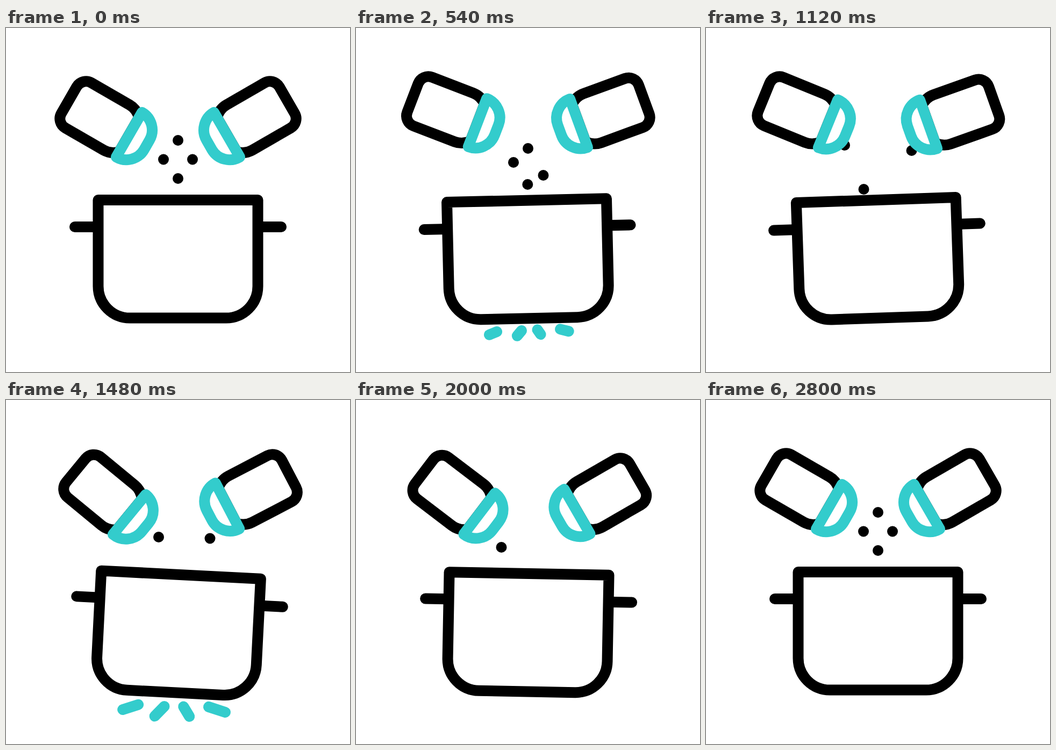
Write an HTML page that moves like this. It is 640 px wide and 640 px high and loops after 3.4 s.

```html
<!DOCTYPE html>
<html lang="en">
<head>
<meta charset="utf-8">
<title>Seasoning the pot</title>
<style>
  html, body { margin: 0; width: 100%; height: 100%; overflow: hidden; background: #fff; }
  svg { display: block; width: 100vw; height: 100vh; }
  .line { fill: #fff; stroke: #000; stroke-width: 20; stroke-linecap: round; stroke-linejoin: round; }
  .teal { stroke: #33cccc; }
</style>
</head>
<body>
<svg viewBox="0 0 640 640">
  <defs>
    <g id="shaker">
      <path class="line" d="M0 -37Q-12 -48.5 -27 -48.5H-109a20 20 0 0 0 -20 20V28.5a20 20 0 0 0 20 20H-27Q-12 48.5 0 37Z"/>
      <path class="line teal" d="M0 -48A38 38 0 0 1 38 -10V10A38 38 0 0 1 0 48Z"/>
    </g>
  </defs>
  <g id="dots"></g>
  <g id="pot">
    <g id="flames"></g>
    <path class="line" d="M128 370H512"/>
    <path class="line" d="M171.5 320H468.5V480.5a59 59 0 0 1 -59 59H230.5a59 59 0 0 1 -59 -59Z"/>
  </g>
  <use id="left" href="#shaker"/>
  <g transform="translate(640 0) scale(-1 1)"><use id="right" href="#shaker"/></g>
</svg>
<script>
const LOOP = 3400, STEP = 20;
const $ = id => document.getElementById(id);

function add(parent, tag, attrs) {
  const el = document.createElementNS('http://www.w3.org/2000/svg', tag);
  for (const k in attrs) el.setAttribute(k, attrs[k]);
  return parent.appendChild(el);
}

// Smooth curve through keys [time, ...values], flat at turning points and ends.
function slope(keys, i, c) {
  const a = keys[i - 1], b = keys[i], d = keys[i + 1];
  if (!a || !d || (b[c] - a[c]) * (d[c] - b[c]) <= 0) return 0;
  return (d[c] - a[c]) / (d[0] - a[0]);
}

function sample(keys, t) {
  const last = keys.length - 1;
  if (t <= keys[0][0]) return keys[0].slice(1);
  if (t >= keys[last][0]) return keys[last].slice(1);
  const i = keys.findIndex(k => k[0] > t) - 1;
  const a = keys[i], b = keys[i + 1], h = b[0] - a[0], s = (t - a[0]) / h;
  const s2 = s * s, s3 = s2 * s;
  return a.slice(1).map((v, n) => {
    const c = n + 1;
    return v + (b[c] - v) * (3 * s2 - 2 * s3)
      + h * slope(keys, i, c) * (s3 - 2 * s2 + s)
      + h * slope(keys, i + 1, c) * (s3 - s2);
  });
}

// Shaker poses: time, cap centre x, y, tilt.
const REST = [229, 198.5, 30], UP = [225.7, 175, 20], DOWN = [229.5, 215, 41];
const leftKeys = [
  [200, ...REST], [500, ...UP], [540, 226, 176, 21], [800, ...DOWN],
  [1070, ...UP], [1120, 227, 178, 22.2], [1430, ...DOWN], [1480, 229.5, 213, 39.5],
  [1720, ...UP], [1950, 229.5, 213, 39], [2000, 229.5, 211.5, 37.3],
  [2180, 225.7, 178, 20], [2350, ...REST]
];
const rightKeys = [
  [200, ...REST], [540, 225.5, 177, 20.1], [580, ...UP], [820, ...DOWN],
  [1080, ...UP], [1120, 226, 179, 19.6], [1340, ...DOWN], [1480, 228, 197, 27.6],
  [1610, ...UP], [1860, ...DOWN], [2000, 228.5, 207.5, 30],
  [2180, 225.7, 178, 20], [2350, ...REST]
];

// Pot: time, drop, tilt.
const potKeys = [
  [200, 0, 0], [400, 0, -2.6], [540, .7, -1.3], [780, 4, 2.6], [1120, 0, -1.95],
  [1180, 0, -2.3], [1480, 5, 2.9], [1780, 0, -2], [2000, 3, 1.06],
  [2120, 3, 1.7], [2360, .7, .3], [2480, 0, 0]
];

// Grains: time, x, y; each one shows only between its first and last key.
const grains = [
  [[0, 320, 209], [220, 320, 209], [540, 320, 224], [900, 320, 335]],
  [[0, 293, 244.5], [360, 293, 244.5], [540, 293, 250], [1120, 293.5, 300], [1400, 293.5, 335]],
  [[0, 347, 244.5], [220, 347, 244.5], [540, 348.5, 274], [860, 350, 335]],
  [[0, 320, 280], [360, 320, 280], [540, 319.3, 291], [860, 318, 335]],
  [[1040, 246, 190], [1120, 258, 218], [1480, 284, 255], [1820, 300, 335]],
  [[1000, 400, 190], [1120, 382.5, 228], [1480, 379.5, 257.5], [1820, 372, 335]],
  [[1760, 238, 212], [2000, 270.5, 274], [2260, 295, 335]],
  [[2180, 258, 188], [2360, 299.5, 202], [2700, 320, 209], [LOOP, 320, 209]],
  [[2260, 258, 186], [2360, 277, 217], [2800, 293, 244.5], [LOOP, 293, 244.5]],
  [[2240, 397, 190], [2360, 365, 225], [2800, 347, 244.5], [LOOP, 347, 244.5]],
  [[2160, 400, 206], [2360, 340, 261.5], [2700, 320, 280], [LOOP, 320, 280]]
].map(keys => ({ keys, el: add($('dots'), 'circle', { r: 10 }) }));

// Flame strokes: inner x, y, outer x, y.
const flames = [
  [259, 563, 222, 577], [305, 562, 283, 587], [334.5, 561, 350, 584], [377, 561, 418, 572]
].map(ends => ({ ends, el: add($('flames'), 'line', { class: 'line teal' }) }));
const flameStarts = [428, 1260, 2226];

const ease = p => (1 - Math.cos(Math.PI * Math.min(1, Math.max(0, p)))) / 2;

function drawFlames(t) {
  const start = flameStarts.find(s => t > s && t < s + 440);
  const head = ease((t - start) / 264), tail = ease((t - start - 140) / 300);
  const lit = head - tail > .01;
  for (const { ends: [x1, y1, x2, y2], el } of flames) {
    el.style.display = lit ? '' : 'none';
    if (!lit) continue;
    el.setAttribute('x1', x1 + (x2 - x1) * tail);
    el.setAttribute('y1', y1 + (y2 - y1) * tail);
    el.setAttribute('x2', x1 + (x2 - x1) * head);
    el.setAttribute('y2', y1 + (y2 - y1) * head);
  }
}

function pose(el, keys, t) {
  const [x, y, tilt] = sample(keys, t);
  el.setAttribute('transform', `translate(${x} ${y}) rotate(${tilt})`);
}

function draw(t) {
  pose($('left'), leftKeys, t);
  pose($('right'), rightKeys, t);
  const [drop, tilt] = sample(potKeys, t);
  $('pot').setAttribute('transform', `translate(0 ${drop}) rotate(${tilt} 320 430)`);
  for (const { keys, el } of grains) {
    const [x, y] = sample(keys, t);
    el.setAttribute('cx', x);
    el.setAttribute('cy', y);
    el.style.display = t >= keys[0][0] && t < keys[keys.length - 1][0] ? '' : 'none';
  }
  drawFlames(t);
}

const begin = performance.now();
function tick() {
  const t = (performance.now() - begin) % LOOP;
  draw(t - t % STEP);
  requestAnimationFrame(tick);
}
tick();
</script>
</body>
</html>
```
